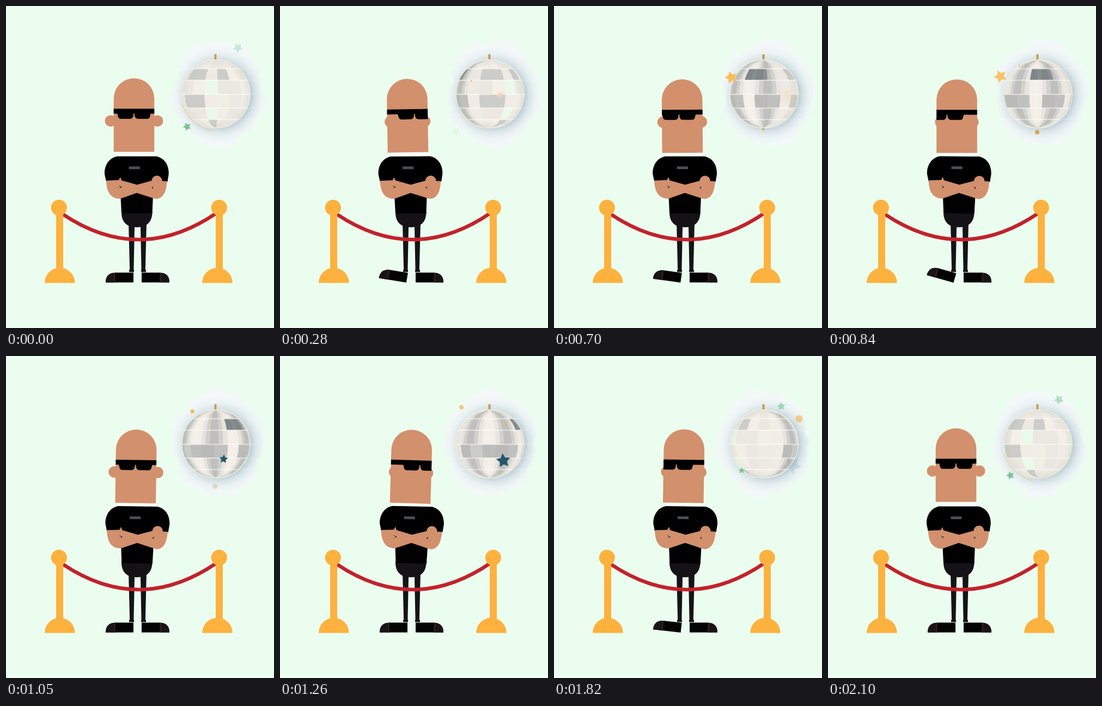
An HTML page that plays this animation: 492x590 px, repeating every 2170 ms.

```html
<!DOCTYPE html>
<html lang="en">
<head>
<meta charset="utf-8">
<title>Bouncer and disco ball</title>
<style>
  html, body { margin: 0; width: 100%; height: 100%; overflow: hidden; background: #ebfdee; }
  svg { display: block; width: 492px; height: 590px; }
</style>
</head>
<body>
<svg viewBox="0 0 492 590">
  <defs>
    <radialGradient id="glow" gradientUnits="userSpaceOnUse" cx="391" cy="163" r="100">
      <stop offset=".58" stop-color="#bccdd5"/>
      <stop offset=".67" stop-color="#d8e4e8"/>
      <stop offset=".78" stop-color="#ecf3f4"/>
      <stop offset=".9" stop-color="#f4f8f9"/>
    </radialGradient>
    <radialGradient id="rim">
      <stop offset=".8" stop-color="#a8aa98" stop-opacity="0"/>
      <stop offset="1" stop-color="#a8aa98" stop-opacity=".18"/>
    </radialGradient>
    <filter id="soft" x="-10%" y="-10%" width="120%" height="120%"><feGaussianBlur stdDeviation=".8"/></filter>
    <clipPath id="ballClip"><circle cx="385.5" cy="161" r="63"/></clipPath>
    <path id="headShape" d="M-37.3 0V-97.5A37.3 37.3 0 0 1 37.3-97.5V0Z"/>
    <clipPath id="headClip"><use href="#headShape"/></clipPath>
    <g id="shoe">
      <path d="M183 506.5Q183 489 202 488.5H234V506.5Z" fill="#050405"/>
      <path d="M183 506.5Q183 489 201 488.5V506.5Z" fill="#191416"/>
      <path d="M199 489V505" stroke="#351d19" stroke-width="2.5"/>
    </g>
    <g id="leg" fill="#161318">
      <path d="M225 396H236.2L234.4 485H227.2Z"/>
      <path d="M226 483.5H235V487.5H226Z"/>
    </g>
  </defs>

  <path id="halo" fill="url(#glow)" filter="url(#soft)"/>
  <path d="M384.5 88.5V101" stroke="#c99a40" stroke-width="4"/>
  <circle cx="385.5" cy="161" r="63" fill="#f4f0e7"/>
  <g id="tiles" clip-path="url(#ballClip)"></g>
  <circle cx="385.5" cy="161" r="63" fill="url(#rim)"/>
  <g id="seams" stroke="#fff"></g>
  <circle cx="385.5" cy="161" r="62.5" fill="none" stroke="#eaf1e2" stroke-width="1.3"/>
  <path id="arc" d="M323 178Q335 215 376 229" fill="none" stroke="#efcf9c" stroke-width="1.6"/>
  <g id="sparks"></g>

  <use href="#leg"/>
  <use href="#leg" transform="matrix(-1 0 0 1 483 0)"/>
  <use id="foot" href="#shoe"/>
  <use href="#shoe" transform="matrix(-1 0 0 1 483 0)"/>
  <path d="M212 376H268.5V380Q267 405 240 405.5Q213 405 212 380Z" fill="#151217"/>

  <g id="body">
    <path d="M204 268H275V277H204Z" fill="#f5fdf7"/>
    <path d="M204.500 275.500H275.500C291 278 299.500 292 298.700 308L296.500 322H271L268.500 380H212L209 322H184L181 308C180.500 292 189 278 204.500 275.500Z"/>
    <path d="M225.500 294H245.500V299H225.500Z" fill="#4a4e55"/>
    <path d="M184 320L207 319L210 313.500L212 319.500L240.500 327.500L268 320L295.500 321C294.500 342 288 353 275 353.500L240 342.500L210 353C194 353.500 184.500 343 184 320Z" fill="#d2906d"/>
    <circle cx="277" cy="320.500" r="9.700" fill="#d2906d"/>
    <path d="M207.500 329.500L213 332L207.500 334ZM271.500 331L267 332.500L271.500 335Z"/>
    <path d="M207.500 330.500L210.500 332L207.500 333.500ZM272 331.500L269.500 332.500L272 334.500Z" fill="#f3f5f1"/>
  </g>

  <g id="head" fill="#d2906d">
    <circle id="earL" cy="-56.500" r="10.500"/>
    <circle id="earR" cy="-56.500" r="10.500"/>
    <use href="#headShape"/>
    <g clip-path="url(#headClip)" fill="#000">
      <path d="M-38-79H38V-70H-38Z"/>
      <path id="lenses" d="M-31-71H-1V-67Q-2-60.500-7-60.500H-24Q-29-60.500-29.500-66ZM31-71H1V-67Q2-60.500 7-60.500H24Q29-60.500 29.500-66Z"/>
    </g>
  </g>

  <path d="M105 382Q246 475.500 387 379" fill="none" stroke="#c2222b" stroke-width="6.500"/>
  <g fill="#fdb13e">
    <circle cx="97.300" cy="369.500" r="14.600"/>
    <path d="M92 380H105V484H92ZM71 507.500A27.800 27.800 0 0 1 126.600 507.500Z"/>
    <circle cx="391.300" cy="369.500" r="14.600"/>
    <path d="M385 380H398V484H385ZM360.200 507.500A27.800 27.800 0 0 1 415.800 507.500Z"/>
  </g>
</svg>
<script>
const LOOP = 2170, STEP = 70, CX = 385.5, CY = 161, R = 63;
const seams = [98, 115, 136, 162, 187, 208, 224];
const el = Object.fromEntries([...document.querySelectorAll('[id]')].map(e => [e.id, e]));

// time, look, head x, head drop, head angle, body angle
const poses = [
  [0, 0, 235, 0, 0, 0],
  [280, 13, 235, 1, -.9, -.25],
  [560, 6, 235.2, 1.8, -.8, -.25],
  [840, -18, 236.5, 2, 0, .55],
  [1260, 16, 239, 2.7, 1.6, 1.3],
  [1540, -8, 238.7, 2.7, 1.6, 1.3],
  [1750, -15, 237.5, 2, 1, .9],
  [2100, 0, 235, 0, 0, 0],
  [LOOP, 0, 235, 0, 0, 0]
];
// start, end, degrees
const taps = [[70, 490, 9.5], [630, 1050, 16], [1260, 1680, 8], [1750, 2100, 11]];
// shape, colour, start, end, from x, y, to x, y, full radius
const sparks = [
  ['star', '#9fd6b2', 1400, 2300, 406.5, 111, 429, 71, 9.5],
  ['star', '#79c592', 1480, 2480, 356, 199, 322, 231, 8.3],
  ['star', '#fdbb50', 230, 1050, 354, 137.5, 303.5, 126, 12.6],
  ['star', '#25566a', 850, 1850, 389.5, 186, 439.5, 200, 17],
  ['dot', '#f5b85a', 750, 1400, 355, 112, 327, 89, 4.2],
  ['dot', '#d9a449', 600, 1100, 384, 222, 384, 241, 4.5],
  ['dot', '#fbae3b', 1150, 1950, 409, 127, 458, 112.6, 6.8],
  ['burst', '#f2d9b3', 130, 800, 395.5, 163, 433.7, 163, 20]
];

const mix = (a, b, p) => a + (b - a) * p;
const fix = n => n.toFixed(1);
const rad = deg => deg * Math.PI / 180;
const noise = n => { const s = Math.sin(n * 127.1) * 43758.5453; return s - Math.floor(s); };
const polygon = points => 'M' + points.map(p => p.map(fix).join(' ')).join('L') + 'Z';

function poseAt(t) {
  const i = poses.findIndex((p, n) => n && t <= p[0]);
  const a = poses[i - 1], b = poses[i];
  const p = (1 - Math.cos(Math.PI * (t - a[0]) / (b[0] - a[0]))) / 2;
  return a.map((v, n) => mix(v, b[n], p));
}

function drawMan(t) {
  const [, look, x, drop, headAngle, bodyAngle] = poseAt(t);
  el.body.setAttribute('transform', `rotate(${bodyAngle} 240 400)`);
  el.head.setAttribute('transform', `translate(${x} ${267.2 + drop}) rotate(${headAngle})`);
  el.lenses.setAttribute('transform', `translate(${look} 0)`);
  const ear = 43 - 3.15 * Math.sqrt(Math.abs(look));
  el.earL.setAttribute('cx', -ear);
  el.earR.setAttribute('cx', ear);
  const tap = taps.find(([from, to]) => t >= from && t <= to);
  const lift = tap ? tap[2] * Math.sin(Math.PI * (t - tap[0]) / (tap[1] - tap[0])) : 0;
  el.foot.setAttribute('transform', `translate(${-.22 * lift} 0) rotate(${lift} 232 506.5)`);
}

// Half of the globe is pale and chequered, the other half has soft grey bands.
function tileColor(col, row, part) {
  const pale = col > 2 && col < 11;
  if (col === 6 && (row === 2 || row === 4)) return '#eafae8';
  let dark;
  if (pale) {
    const grey = (row === 1 || row === 3) && (col === 4 || col === 5) || row === 1 && col === 7 || row === 5 && col === 6;
    dark = grey ? .36 : noise(col * 7 + row * 3.3) * .1;
  } else {
    const u = (col > 8 ? col - 16 : col) + part - .5;
    dark = .5 * Math.pow(.5 - .5 * Math.cos(2 * Math.PI * u / 3), 1.6);
    if (row === 3 && col) dark = .36 + .22 * noise(col * 3);
    if (row === 1 && col < 2) dark = .9 + .2 * noise(col + part);
  }
  const channel = (light, shade) => Math.round(mix(light, shade, dark));
  return `rgb(${channel(245, 132)},${channel(241, 138)},${channel(233, 141)})`;
}

function drawBall(t) {
  const turn = (t - 840) * 360 / LOOP - 15;
  const edge = (lon, y) => [CX + Math.sqrt(Math.max(0, R * R - (y - CY) ** 2)) * Math.sin(rad(lon)), y];
  let out = '';
  for (let row = 0; row < 6; row++) {
    const top = seams[row], bottom = seams[row + 1], ys = [top, (top + bottom) / 2, bottom];
    for (let n = 0; n < 48; n++) {
      const raw = turn + n * 7.5, start = ((raw + 180) % 360 + 360) % 360 - 180;
      const a = Math.max(start, -90), b = Math.min(start + 7.5, 90);
      if (a >= b) continue;
      const d = polygon([...ys.map(y => edge(a, y)), ...ys.map(y => edge(b, y)).reverse()]);
      const color = tileColor(Math.floor(n / 3), row, (n % 3 + .5) / 3);
      out += `<path d="${d}" fill="${color}" stroke="${color}" stroke-width=".6"/>`;
    }
  }
  el.tiles.innerHTML = out;
  el.arc.setAttribute('opacity', Math.max(0, 1 - Math.min(t, LOOP - t) / 350));
}

function drawHalo(t) {
  const phase = t / LOOP * 2 * Math.PI, points = [];
  const cx = 389 + 4.5 * Math.sin(phase);
  for (let i = 0; i < 160; i++) {
    const a = i / 160 * 2 * Math.PI;
    const wave = 3.5 * Math.sin(5 * a + phase) + 2.5 * Math.sin(11 * a - 2 * phase)
      + 2 * Math.sin(23 * a + 3 * phase) + Math.sin(41 * a - phase);
    points.push([cx + (83 + wave) * Math.cos(a), 160 + (97 + wave) * Math.sin(a)]);
  }
  el.halo.setAttribute('d', polygon(points));
}

function starPath(x, y, r, tips, inner, tilt) {
  return polygon(Array.from({ length: tips * 2 }, (_, i) => {
    const a = Math.PI * i / tips - Math.PI / 2 + tilt, d = i % 2 ? r * inner : r;
    return [x + d * Math.cos(a), y + d * Math.sin(a)];
  }));
}

function drawSparks(t) {
  el.sparks.innerHTML = sparks.map(([shape, color, from, to, x0, y0, x1, y1, full]) => {
    const p = ((t - from + LOOP) % LOOP) / (to - from);
    if (p >= 1) return '';
    const x = mix(x0, x1, p), y = mix(y0, y1, p), r = full * (1 - (1 - p) ** 3);
    const style = `fill="${color}" opacity="${Math.min(1, (1 - p) * 3.5)}"`;
    if (shape === 'dot') return `<circle cx="${x}" cy="${y}" r="${r}" ${style}/>`;
    const d = shape === 'star' ? starPath(x, y, r, 5, .5, .3 - p) : starPath(x, y, r, 14, .25, .1);
    return `<path d="${d}" ${style}/>`;
  }).join('');
}

el.seams.innerHTML = seams.slice(1, -1).map(y => {
  const w = Math.sqrt(R * R - (y - CY) ** 2);
  return `<path d="M${CX - w} ${y}H${CX + w}" opacity=".85"/><path d="M314 ${y}H460" opacity=".3"/>`;
}).join('');

let shown = -1;
function tick() {
  const t = Math.floor(performance.now() % LOOP / STEP) * STEP;
  if (t !== shown) {
    shown = t;
    for (const draw of [drawMan, drawBall, drawHalo, drawSparks]) draw(t);
  }
  requestAnimationFrame(tick);
}
tick();
</script>
</body>
</html>
```
